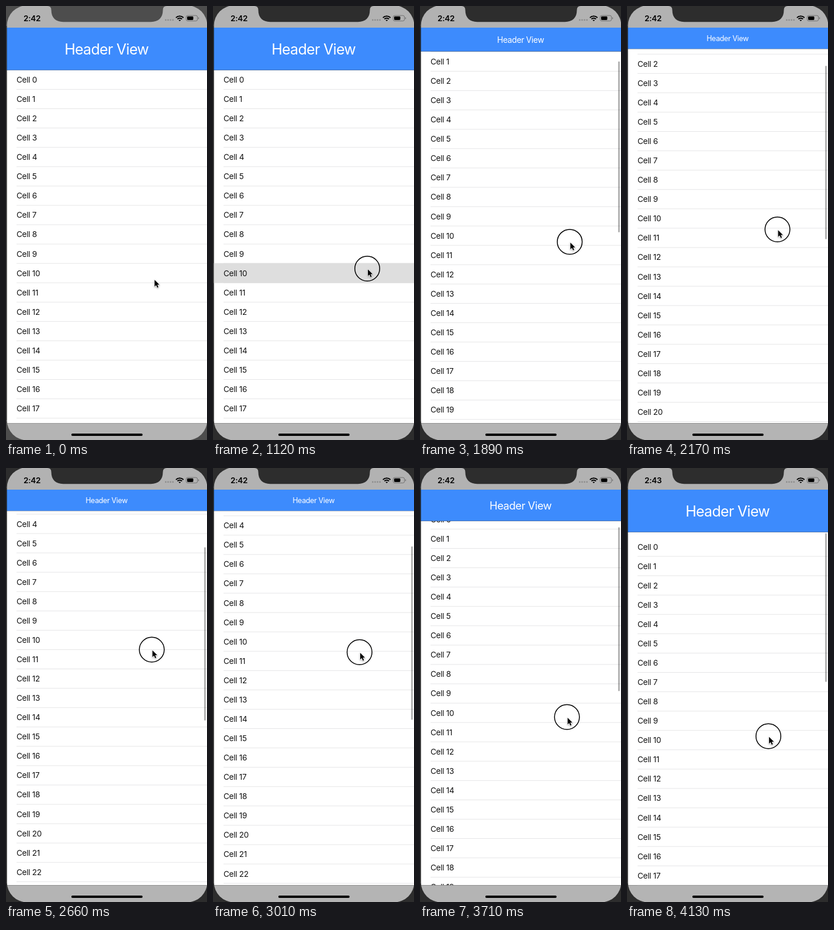
Write an HTML page with a canvas that moves like this. It is 344 px wide and 742 px high and loops after 4200 ms.

```html
<!DOCTYPE html>
<html lang="en">
<head>
<meta charset="utf-8">
<title>Collapsing header</title>
<style>
html, body { margin: 0; width: 100%; height: 100%; overflow: hidden; background: #2d2d2d; }
canvas { display: block; width: 344px; height: 742px; }
</style>
</head>
<body>
<canvas id="stage"></canvas>
<script>
const W = 344, H = 742, LOOP = 4200, STEP = 70;
const LEFT = 1.6, BAR_H = 37, LIST_END = 713.3;
const HEAD_MAX = 72.5, HEAD_MIN = 36.2, ROW = 33.07;
const FONT = 'Inter, "Open Sans", sans-serif';

const canvas = document.getElementById('stage');
const ctx = canvas.getContext('2d');
const dpr = window.devicePixelRatio || 1;
canvas.width = W * dpr;
canvas.height = H * dpr;

// Smooth monotone curve through [time, value] points
function track(pts) {
  const slope = i => (pts[i + 1][1] - pts[i][1]) / (pts[i + 1][0] - pts[i][0]);
  const tan = pts.map((p, i) => {
    if (i === 0) return slope(0);
    if (i === pts.length - 1) return slope(i - 1);
    const a = slope(i - 1), b = slope(i);
    return a * b > 0 ? 2 * a * b / (a + b) : 0;
  });
  return t => {
    if (t <= pts[0][0]) return pts[0][1];
    for (let i = 0; i < pts.length - 1; i++) {
      const [t0, v0] = pts[i], [t1, v1] = pts[i + 1];
      if (t > t1) continue;
      const d = t1 - t0, u = (t - t0) / d, u2 = u * u, u3 = u2 * u;
      return v0 * (2 * u3 - 3 * u2 + 1) + v1 * (3 * u2 - 2 * u3)
        + d * (tan[i] * (u3 - 2 * u2 + u) + tan[i + 1] * (u3 - u2));
    }
    return pts[pts.length - 1][1];
  };
}

const scrollAt = track([[1400, 0], [1610, 12], [2170, 57], [2660, 126.4],
  [2800, 136], [2870, 136], [3360, 56.5], [3990, -2.5], [4130, -8.6]]);
const fingerX = track([[0, 253.2], [280, 264], [1400, 264], [1610, 255],
  [2170, 257.5], [2660, 249.5], [2870, 249.5], [3360, 256], [4130, 242]]);
const fingerY = track([[0, 467], [280, 449], [1400, 449], [1610, 423.5],
  [2170, 382], [2660, 310.5], [2800, 301], [2870, 301], [3360, 389],
  [3990, 449], [4130, 458.5]]);

function rect(x, y, w, h, color) {
  ctx.fillStyle = color;
  ctx.fillRect(x, y, w, h);
}

function pill(x, y, w, h, r, color) {
  ctx.beginPath();
  ctx.roundRect(x, y, w, h, r);
  ctx.fillStyle = color;
  ctx.fill();
}

function text(str, x, y, size, weight, color, spacing, align = 'left') {
  ctx.font = `${weight} ${size}px ${FONT}`;
  ctx.letterSpacing = spacing + 'px';
  ctx.textAlign = align;
  ctx.fillStyle = color;
  ctx.fillText(str, x, y);
}

function drawList(top, offset, pressed) {
  ctx.save();
  ctx.beginPath();
  ctx.rect(0, top, W, LIST_END - top);
  ctx.clip();
  rect(0, top, W, LIST_END - top, '#fff');
  for (let i = 0; i < 26; i++) {
    const y = top - offset + i * ROW;
    if (y > LIST_END) break;
    rect(18, y + ROW - 0.6, W, 1, '#e6e6e7');
    if (pressed && i === 10) rect(0, y - 0.6, W, ROW + 1, '#dedede');
    text('Cell ' + i, 18, y + ROW / 2 + 4.9, 13.5, 400, '#111', -0.25);
  }
  ctx.restore();
}

function drawScrollBar(top, offset) {
  const view = LIST_END - top - 18, total = 1306;
  const len = view * view / total - Math.max(0, -offset);
  const y = top + 2 + Math.max(0, offset) * view / total;
  pill(339.3, y, 2.4, len, 1.2, 'rgba(0,0,0,.36)');
}

function drawHeader(height) {
  rect(0, BAR_H, W, height, '#3d8bfd');
  ctx.save();
  ctx.translate(172.1, BAR_H + height / 2);
  ctx.scale(height / HEAD_MAX, height / HEAD_MAX);
  text('Header View', 0, 9.4, 25, 400, '#fff', -0.7, 'center');
  ctx.restore();
}

function drawNotch(color) {
  ctx.beginPath();
  ctx.moveTo(71, -1);
  ctx.lineTo(71, 0);
  ctx.quadraticCurveTo(77.5, 0, 77.5, 7);
  ctx.bezierCurveTo(77.5, 20, 85, 27.2, 98, 27.2);
  ctx.lineTo(248, 27.2);
  ctx.bezierCurveTo(261, 27.2, 268.5, 20, 268.5, 7);
  ctx.quadraticCurveTo(268.5, 0, 275, 0);
  ctx.lineTo(275, -1);
  ctx.fillStyle = color;
  ctx.fill();
}

function drawStatus(clock) {
  rect(0, 0, W, BAR_H, '#b2b2b2');
  text(clock, 30, 26, 13.5, 600, '#000', -0.2);
  for (let i = 0; i < 4; i++) pill(272 + i * 4.1, 22.6, 2.7, 2.7, 1.35, '#8c8c8c');

  ctx.save();
  ctx.beginPath();
  ctx.moveTo(297.3, 26);
  ctx.arc(297.3, 26, 10, -Math.PI * 0.76, -Math.PI * 0.24);
  ctx.closePath();
  ctx.clip();
  ctx.strokeStyle = '#000';
  for (const r of [1.3, 5.2, 8.8]) {
    ctx.beginPath();
    ctx.arc(297.3, 26, r, -Math.PI, 0);
    ctx.lineWidth = r < 2 ? 2.6 : 2;
    ctx.stroke();
  }
  ctx.restore();

  ctx.beginPath();
  ctx.roundRect(308.3, 16.2, 19.4, 9.4, 2.8);
  ctx.strokeStyle = '#727272';
  ctx.lineWidth = 1;
  ctx.stroke();
  pill(310, 17.8, 10.5, 6.2, 1.4, '#000');
  pill(328.9, 19.3, 1.3, 3.2, 0.7, '#727272');
}

function drawPointer(x, y) {
  ctx.save();
  ctx.translate(x, y);
  ctx.scale(0.93, 0.93);
  ctx.beginPath();
  const pts = [[0, 0], [0, 12.4], [2.9, 9.7], [5, 14.5], [7, 13.6], [5, 8.9], [8.9, 8.9]];
  pts.forEach(p => ctx.lineTo(...p));
  ctx.closePath();
  ctx.shadowColor = 'rgba(0,0,0,.35)';
  ctx.shadowBlur = 2.5 * dpr;
  ctx.shadowOffsetY = 1 * dpr;
  ctx.lineJoin = 'round';
  ctx.lineWidth = 1.6;
  ctx.strokeStyle = '#fff';
  ctx.stroke();
  ctx.shadowColor = 'transparent';
  ctx.fillStyle = '#000';
  ctx.fill();
  ctx.restore();
}

function draw(t) {
  const frame = t < 910 ? '#4d4d4d' : '#2d2d2d';
  const touching = t >= 1120, dragging = t >= 1470;
  const offset = scrollAt(t);
  const head = HEAD_MAX - Math.min(HEAD_MAX - HEAD_MIN, Math.max(0, offset));
  const top = BAR_H + head;

  ctx.setTransform(dpr, 0, 0, dpr, 0, 0);
  rect(0, 0, W, H, frame);
  rect(0.6, 34, 1.2, 674, '#151515');

  ctx.save();
  ctx.beginPath();
  ctx.roundRect(LEFT, -1, W - LEFT + 0.4, H + 1.5, 34.5);
  ctx.clip();
  drawList(top, offset, touching && !dragging);
  if (dragging) drawScrollBar(top, offset);
  drawHeader(head);
  drawStatus(t < 3780 ? '2:42' : '2:43');
  drawNotch(frame);
  rect(0, LIST_END, W, H - LIST_END, '#b4b4b4');
  pill(111.8, 730.9, 122, 4, 2, '#000');
  ctx.restore();

  const x = fingerX(t), y = fingerY(t);
  if (touching) {
    ctx.beginPath();
    ctx.arc(x, y, 21.3, 0, Math.PI * 2);
    ctx.strokeStyle = '#000';
    ctx.lineWidth = 1.5;
    ctx.stroke();
  }
  drawPointer(x + 1.1, y + 1.2);
}

const start = performance.now();
function tick() {
  const t = (performance.now() - start) % LOOP;
  draw(Math.floor(t / STEP) * STEP);
  requestAnimationFrame(tick);
}
tick();
</script>
</body>
</html>
```
